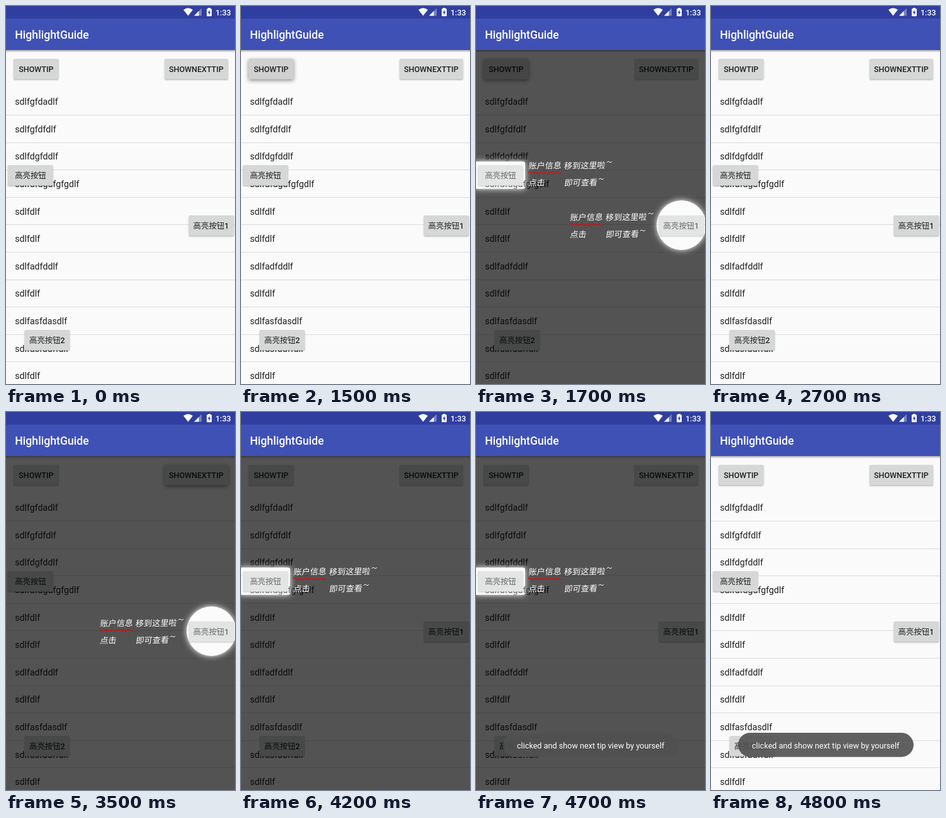
Write an HTML page with a canvas that moves like this. It is 364x601 px and loops after 5700 ms.

```html
<!DOCTYPE html>
<html lang="en">
<head>
<meta charset="utf-8">
<title>HighlightGuide</title>
<style>
html, body { margin: 0; width: 100%; height: 100%; overflow: hidden; background: #fafafa; }
canvas { display: block; width: 364px; height: 601px; }
</style>
</head>
<body>
<canvas id="stage"></canvas>
<script>
const W = 364, H = 601, LOOP = 5700, BAR = 70;
const LATIN = 'Roboto, sans-serif';
const CJK = '"Noto Sans CJK SC", "Noto Sans CJK JP", "Noto Sans CJK", sans-serif';
const INK = '#202020';
const ROWS = ['sdlfgfdadlf', 'sdlfgfdfdlf', 'sdlfdgfddlf', 'sdlfdfdgdfgfgdlf', 'sdlfdlf', 'sdlfdlf',
  'sdlfadfddlf', 'sdlfdlf', 'sdlfasfdasdlf', 'sdlfdsfadffdlf', 'sdlfdlf'];

const ratio = window.devicePixelRatio || 1;

function prepare(canvas) {
  canvas.width = Math.round(W * ratio);
  canvas.height = Math.round(H * ratio);
  const c = canvas.getContext('2d');
  c.scale(ratio, ratio);
  return c;
}

const ctx = prepare(document.getElementById('stage'));
const maskCanvas = document.createElement('canvas');
const mask = prepare(maskCanvas);

function text(str, x, y, font, color) {
  ctx.font = font;
  ctx.fillStyle = color;
  ctx.fillText(str, x, y);
}

function rect(x, y, w, h, color) {
  ctx.fillStyle = color;
  ctx.fillRect(x, y, w, h);
}

function shape(points, color) {
  ctx.fillStyle = color;
  ctx.beginPath();
  points.forEach(([x, y]) => ctx.lineTo(x, y));
  ctx.fill();
}

function setShadow(c, color, blur, dy) {
  c.shadowColor = color;
  c.shadowBlur = blur * ratio;
  c.shadowOffsetY = dy * ratio;
}

function button(x, y, w, h, raised, color) {
  ctx.save();
  if (raised) setShadow(ctx, 'rgba(0,0,0,.45)', 6, 2);
  else setShadow(ctx, 'rgba(0,0,0,.3)', 2, 1);
  ctx.fillStyle = color || '#d6d7d7';
  ctx.beginPath();
  ctx.roundRect(x, y, w, h, 2);
  ctx.fill();
  ctx.restore();
}

function label(str, x, y) {
  text(str, x, y, '500 12.5px ' + LATIN, INK);
}

function cjkButton(x, y, textX, digit) {
  button(x, y, 71.5, 32.5);
  text('高亮按钮', textX, y + 20.8, '400 12.4px ' + CJK, INK);
  label(digit, textX + 49.6, y + 20.8);
}

function statusBar() {
  rect(0, 0, W, 20, '#303f9f');
  ctx.fillStyle = '#fff';
  ctx.beginPath();
  ctx.moveTo(289.5, 15.5);
  ctx.lineTo(282, 6);
  ctx.quadraticCurveTo(289.5, 0.5, 297, 6);
  ctx.fill();
  shape([[299, 15.5], [311, 15.5], [311, 3.5]], 'rgba(255,255,255,.35)');
  shape([[299, 15.5], [306.5, 15.5], [306.5, 8]], '#fff');
  rect(321, 3, 4, 2, '#fff');
  ctx.fillStyle = '#fff';
  ctx.beginPath();
  ctx.roundRect(319, 4.2, 8, 12, 1);
  ctx.fill();
  shape([[323.6, 6], [320.8, 11], [322.6, 11], [322.6, 14.4], [325.3, 9.4], [323.6, 9.4]], '#303f9f');
  text('1:33', 333, 14.6, '500 12.5px ' + LATIN, '#fff');
}

function appBar() {
  rect(0, 20, W, BAR - 20, '#3f51b5');
  text('HighlightGuide', 14.2, 52, '500 17.7px ' + LATIN, '#fff');
  const g = ctx.createLinearGradient(0, BAR, 0, BAR + 4);
  g.addColorStop(0, 'rgba(0,0,0,.32)');
  g.addColorStop(1, 'rgba(0,0,0,0)');
  rect(0, BAR, W, 4, g);
}

function page(tipDown, nextDown) {
  rect(0, 0, W, H, '#fafafa');
  ROWS.forEach((row, i) => {
    text(row, 14.2, 157.2 + 43.6 * i, '400 14.2px ' + LATIN, INK);
    rect(0, Math.round(173 + 43.6 * i), W, 1, '#dcdcdc');
  });
  statusBar();
  appBar();
  button(12, 84, 71.5, 32.5, tipDown, tipDown && '#d0d0d0');
  label('SHOWTIP', 20.3, 105);
  button(252, 84, 101, 32.5, nextDown);
  label('SHOWNEXTTIP', 259, 105);
  cjkButton(3, 253, 14.2, '');
  cjkButton(290.7, 333, 297.6, '1');
  cjkButton(29.7, 515, 37, '2');
}

const leftHole = () => mask.roundRect(-2, 247.5, 80, 43, 3);
const rightHole = () => mask.arc(326.5, 348.5, 39.3, 0, 7);

function dim(holes) {
  mask.clearRect(0, 0, W, H);
  mask.fillStyle = 'rgba(0,0,0,.667)';
  mask.fillRect(0, BAR, W, H - BAR);
  for (const hole of holes) {
    mask.save();
    mask.fillStyle = '#fff';
    setShadow(mask, '#fff', 10, 0);
    mask.beginPath();
    hole();
    mask.fill();
    mask.restore();
    mask.save();
    mask.globalCompositeOperation = 'destination-out';
    mask.beginPath();
    hole();
    mask.fill();
    mask.restore();
  }
  ctx.drawImage(maskCanvas, 0, 0, W, H);
}

// Hand-written style note with a red wavy underline
function note(x, y) {
  const pen = (str, dx, dy) => {
    ctx.save();
    ctx.translate(x + dx, y + dy);
    ctx.transform(1, -0.02, -0.12, 1, 0, 0);
    text(str, 0, 0, '300 13.1px ' + CJK, '#fff');
    ctx.restore();
  };
  const tilde = (dx, dy) => {
    ctx.beginPath();
    ctx.moveTo(x + dx, y + dy);
    ctx.bezierCurveTo(x + dx + 3, y + dy - 5, x + dx + 5, y + dy + 3, x + dx + 8, y + dy - 2);
    ctx.stroke();
  };
  pen('账户信息', 0, 5);
  pen('移到这里啦', 56.5, 5);
  pen('点击', 0, 32);
  pen('即可查看', 57, 32);
  ctx.strokeStyle = '#fff';
  ctx.lineWidth = 1;
  tilde(125, -5);
  tilde(112, 22);
  ctx.strokeStyle = '#cc1414';
  ctx.lineWidth = 1.6;
  ctx.beginPath();
  for (let i = 0; i <= 52; i++) ctx.lineTo(x + i, y + 11.3 - 1.3 * Math.sin(i * 0.72));
  ctx.stroke();
}

function toast(alpha) {
  ctx.save();
  ctx.globalAlpha = alpha;
  ctx.fillStyle = 'rgba(80,80,80,.9)';
  ctx.beginPath();
  ctx.roundRect(43, 510, 279, 38.5, 19.25);
  ctx.fill();
  text('clicked and show next tip view by yourself', 65, 534.6, '400 12.65px ' + LATIN, '#fff');
  ctx.restore();
}

function draw(t) {
  const within = (a, b) => t >= a && t < b;
  const both = within(1700, 2700);
  const right = both || within(3500, 4200);
  const left = both || within(4200, 4800);
  page(within(1500, 2700), within(3300, 4200));
  if (left || right) {
    const holes = [];
    if (left) holes.push(leftHole);
    if (right) holes.push(rightHole);
    dim(holes);
    if (left) note(83, 254);
    if (right) note(149, 336);
  }
  if (t >= 4400) toast(Math.min(1, (Math.floor((t - 4400) / 100) + 1) / 4));
}

const start = performance.now();
function tick() {
  draw((performance.now() - start) % LOOP);
  requestAnimationFrame(tick);
}
tick();
</script>
</body>
</html>
```
